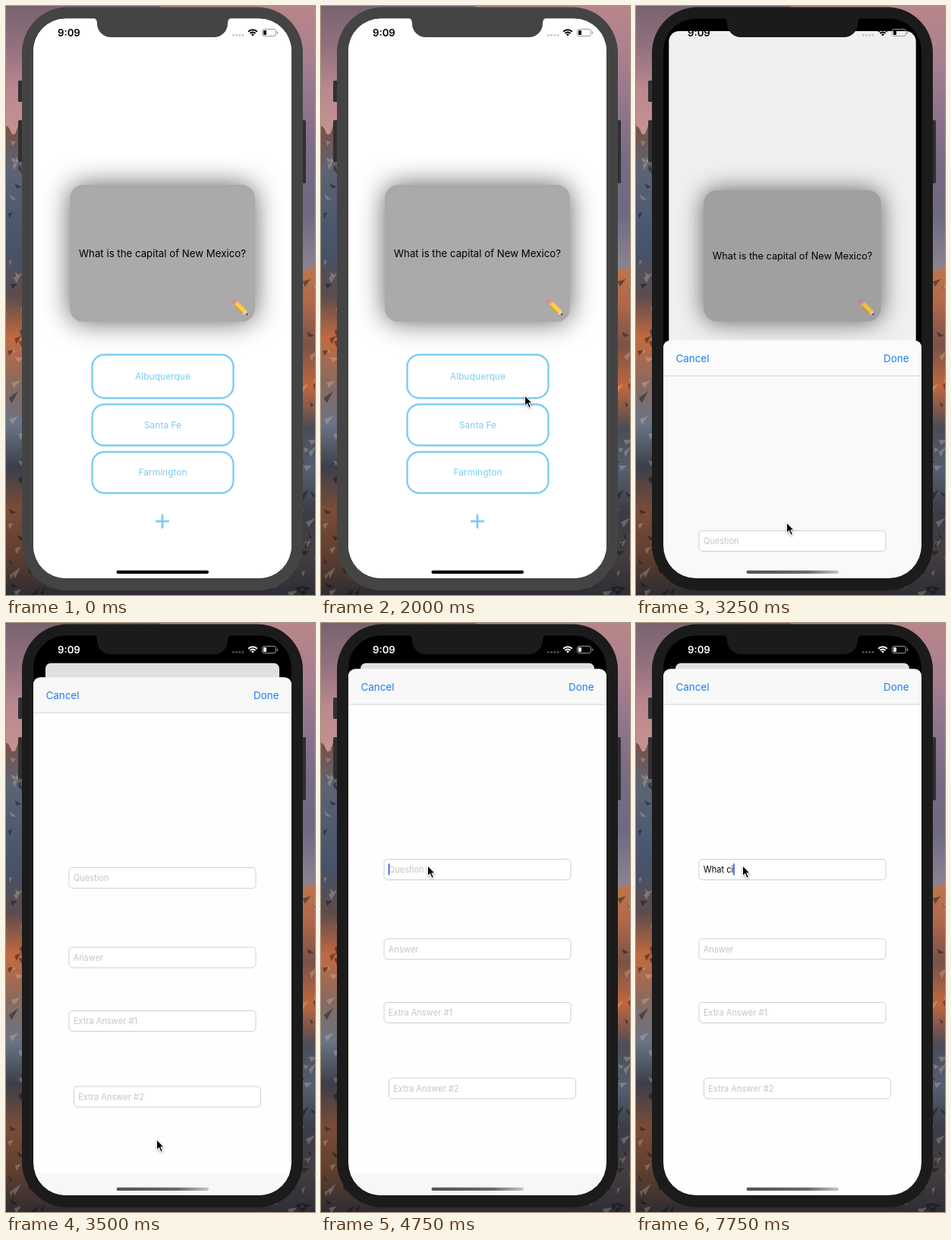
These frames come from a looping animation (407 by 774 pixels, 8000 ms). An HTML page with a canvas:

```html
<!DOCTYPE html>
<html lang="en">
<head>
<meta charset="utf-8">
<title>Flashcards</title>
<style>
html, body { margin: 0; width: 100%; height: 100%; overflow: hidden; background: #333; }
canvas { display: block; width: 407px; height: 774px; }
</style>
</head>
<body>
<canvas id="stage" width="407" height="774"></canvas>
<script>
const W = 407, H = 774, LOOP = 8000, STEP = 250;
const stage = document.getElementById('stage');
const BLUE = '#7dcdf3', LINK = '#1f7bf6';
let ctx = stage.getContext('2d');

function box(x, y, w, h, r, fill, stroke, line = 1) {
  ctx.beginPath();
  ctx.roundRect(x, y, w, h, r);
  if (fill) { ctx.fillStyle = fill; ctx.fill(); }
  if (stroke) { ctx.strokeStyle = stroke; ctx.lineWidth = line; ctx.stroke(); }
}

function triangle(x0, y0, x1, y1, x2, y2, fill) {
  ctx.beginPath();
  ctx.moveTo(x0, y0);
  ctx.lineTo(x1, y1);
  ctx.lineTo(x2, y2);
  ctx.closePath();
  ctx.fillStyle = fill;
  ctx.fill();
}

function text(str, x, y, size, color, align = 'left', weight = 400) {
  ctx.font = `${weight} ${size}px Inter, Roboto, sans-serif`;
  ctx.textAlign = align;
  ctx.fillStyle = color;
  ctx.fillText(str, x, y);
}

// Evenly spaced colours along a line
function blend(x0, y0, x1, y1, colors) {
  const g = ctx.createLinearGradient(x0, y0, x1, y1);
  colors.forEach((c, i) => g.addColorStop(i / (colors.length - 1), c));
  return g;
}

function random(seed) {
  return () => (seed = (seed * 16807) % 2147483647) / 2147483647;
}

function mountain(x, w, top, tones, seed) {
  const rnd = random(seed);
  ctx.fillStyle = blend(0, top, 0, H, tones);
  ctx.beginPath();
  ctx.moveTo(x, H);
  for (let dx = 0; dx <= w; dx += 4) ctx.lineTo(x + dx, top + rnd() * 14);
  ctx.lineTo(x + w, H);
  ctx.fill();
  for (let y = top + 16; y < H; y += 2) {
    const px = x + rnd() * w, len = 4 + rnd() * 9, lean = (rnd() - 0.5) * 18;
    triangle(px, y, px + len, y + lean, px + len * 0.3, y + 7,
      rnd() < 0.6 ? 'rgba(8,12,20,.42)' : 'rgba(255,228,210,.24)');
  }
}

function paintWallpaper() {
  ctx.fillStyle = blend(0, 0, 0, 165, ['#79636f', '#93717f', '#bb888f', '#c4928f']);
  ctx.fillRect(0, 0, W / 2, H);
  ctx.fillStyle = blend(0, 0, 0, 340, ['#b98689', '#a98090', '#8e758c', '#786b84', '#6f6981', '#8a8290']);
  ctx.fillRect(W / 2, 0, W / 2, H);
  mountain(0, W / 2, 157, ['#7a5146', '#5d6373', '#4f5b70', '#465267', '#5d4c4c', '#c46a40',
    '#8a6a5e', '#6a7485', '#3c3f4a', '#7a4c38', '#61402f', '#2e2c31'], 17);
  mountain(W / 2, W / 2 + 4, 336, ['#c0784f', '#b0684a', '#7a5248', '#c0673e', '#4b4c57',
    '#565f70', '#3a3c46', '#453e41', '#2d2e35'], 61);
  ctx.fillStyle = '#2f2d33';
  ctx.fillRect(60, 760, 290, 14);
}

function makeWallpaper() {
  const layer = document.createElement('canvas');
  layer.width = W;
  layer.height = H;
  const main = ctx;
  ctx = layer.getContext('2d');
  paintWallpaper();
  ctx = main;
  return layer;
}

function screenBox(radius, fill) {
  box(36, 16.5, 340, 735.5, radius, fill);
}

function bezel(color) {
  box(16, 98, 6, 28, 1.5, '#303033');
  box(16, 150, 6, 55, 1.5, '#303033');
  box(390, 150, 5, 83, 1.5, '#303033');
  box(21, 1.5, 370, 766.5, 60, color);
}

function notch(color) {
  ctx.fillStyle = color;
  ctx.beginPath();
  ctx.moveTo(112, 15);
  ctx.arcTo(120, 15, 120, 30, 7);
  ctx.arcTo(120, 41, 140, 41, 18);
  ctx.arcTo(292, 41, 292, 22, 18);
  ctx.arcTo(292, 15, 300, 15, 7);
  ctx.lineTo(300, 15);
  ctx.fill();
}

function statusBar(ink, faint) {
  text('9:09', 68, 39.6, 13.2, ink, 'left', 600);
  for (let i = 0; i < 4; i++) box(298 + i * 4.2, 37, 2.8, 2.8, 1.4, faint);
  ctx.strokeStyle = ink;
  for (const [r, line] of [[8.2, 2], [5, 2], [1.4, 2.8]]) {
    ctx.lineWidth = line;
    ctx.beginPath();
    ctx.arc(325, 39.5, r, -Math.PI * 0.75, -Math.PI * 0.25);
    ctx.stroke();
  }
  box(337.5, 30.5, 18, 9, 2.5, null, '#999');
  box(339, 32, 4, 6, 1, ink);
  box(357, 33.5, 1.3, 3.2, 0.6, '#999');
}

function pencil() {
  ctx.save();
  ctx.translate(299, 387);
  ctx.rotate(Math.PI / 4);
  box(-1, -4, 6, 8, 2, '#d98a92');
  box(3.5, -4, 3, 8, 0, '#b9b2ac');
  box(6, -4, 15, 8, 0, blend(0, -4, 0, 4, ['#f3b92e', '#ffd95c', '#d8921f']));
  triangle(21, -4, 27.5, 0, 21, 4, '#eed0a2');
  triangle(24.8, -1.7, 27.5, 0, 24.8, 1.7, '#3a3330');
  ctx.restore();
}

// Card screen, shrunk about its centre and dimmed while a sheet covers it
function cardScreen(scale, dim, radius) {
  ctx.save();
  ctx.translate(206, 384 + (1 - scale) * 18);
  ctx.scale(scale, scale);
  ctx.translate(-206, -384);
  screenBox(radius, '#fff');
  ctx.clip();

  ctx.shadowColor = 'rgba(0,0,0,.62)';
  ctx.shadowBlur = 35 * scale;
  box(84, 235, 244, 180, 18, '#aaa');
  ctx.shadowColor = 'transparent';
  text('What is the capital of New Mexico?', 206, 330, 13.25, '#000', 'center');
  pencil();

  for (const [label, y, h] of [['Albuquerque', 458.2, 57], ['Santa Fe', 523.5, 54], ['Farmington', 586, 54]]) {
    box(113.5, y, 186, h, 16, null, BLUE, 2.4);
    text(label, 206.5, y + h / 2 + 4.4, 12, BLUE, 'center');
  }
  box(197, 675.8, 18, 2.8, 0, BLUE);
  box(204.6, 668, 2.8, 18.5, 0, BLUE);

  screenBox(radius, `rgba(0,0,0,${dim})`);
  ctx.restore();
}

function field(hint, x, y, value, caret) {
  box(x, y, 246, 27, 4.5, '#fff', '#cfcfd1');
  text(value || hint, x + 5.7, y + 17.6, 11.1, value ? '#000' : '#c6c6c9');
  if (caret) box(x + 5.6 + ctx.measureText(value).width, y + 5.5, 1.8, 15.5, 0.8, '#3f65e8');
}

function sheet(top, typed, caret, rising) {
  box(36, top, 340, H, 9, rising ? '#f9f9f9' : '#fefefe');
  box(36, top, 340, 46, [9, 9, 0, 0], rising ? '#fbfbfb' : '#f8f8f8');
  box(36, top + 46, 340, 1, 0, '#d4d4d6');
  text('Cancel', 52.5, top + 28.3, 13.4, LINK);
  text('Done', 359.5, top + 28.3, 13.4, LINK, 'right');
  field('Question', 83, top + 250, typed, caret);
  field('Answer', 83, top + 354.5, '');
  field('Extra Answer #1', 83, top + 438, '');
  field('Extra Answer #2', 89.5, top + 537.5, '');
}

function homeBar(covered) {
  const fill = covered ? blend(146, 0, 267, 0, ['#555', '#5c5c5c', '#6c6c6c', '#c8c8c8']) : '#000';
  box(145.5, 741.8, 121.5, 4.2, 2.1, fill);
}

// Pointer stops: time, x, y
const STOPS = [[1000, 123, 366], [2000, 268, 511], [2750, 198, 678], [3750, 198, 678], [4500, 140, 318]];

function pointerAt(t) {
  let [, x, y] = STOPS[0];
  for (let i = 1; i < STOPS.length; i++) {
    const [t0, x0, y0] = STOPS[i - 1], [t1, x1, y1] = STOPS[i];
    if (t <= t0) break;
    const p = Math.min(1, (t - t0) / (t1 - t0)), ease = p * p * (3 - 2 * p);
    x = x0 + (x1 - x0) * ease;
    y = y0 + (y1 - y0) * ease;
  }
  return [x, y];
}

function pointer(x, y) {
  const arrow = new Path2D('M1 2V13.4L3.8 10.7L6.3 16.6L7.8 16L5.3 10.2H9Z');
  ctx.save();
  ctx.translate(x, y);
  ctx.strokeStyle = '#fff';
  ctx.lineWidth = 2;
  ctx.shadowColor = 'rgba(0,0,0,.35)';
  ctx.shadowBlur = 3;
  ctx.shadowOffsetY = 1;
  ctx.stroke(arrow);
  ctx.shadowColor = 'transparent';
  ctx.fillStyle = '#000';
  ctx.fill(arrow);
  ctx.restore();
}

// One letter per step from 6 s, with a one-step pause after the first word
function typedAt(t) {
  const steps = (t - 5750) / STEP - (t >= 7000 ? 1 : 0);
  return 'What ci'.slice(0, Math.max(0, steps));
}

const wallpaper = makeWallpaper();

function render(now) {
  const t = Math.floor((now % LOOP) / STEP) * STEP;
  const covered = t >= 3250, rising = t === 3250, light = covered && !rising;
  const frame = covered ? '#1b1b1b' : '#444';

  ctx.drawImage(wallpaper, 0, 0);
  bezel(frame);
  ctx.save();
  screenBox(43, covered ? '#000' : '#fff');
  ctx.clip();
  if (!covered) cardScreen(1, 0, 0);
  else if (rising) cardScreen(0.957, 0.06, 14);
  else cardScreen(0.906, 0.12, 8);

  statusBar(light ? '#fff' : '#000', light ? '#555' : '#c4c4c4');
  if (covered) {
    const top = rising ? 439.5 : t === 3500 ? 71.5 : 60.5;
    const caret = t >= 4750 && (t < 5500 || t >= 6000);
    sheet(top, typedAt(t), caret, rising);
    if (light && t < 7250) box(36, 723, 340, 30, 0, '#f7f7f7');
  }
  homeBar(covered);
  ctx.restore();
  notch(frame);
  if (t >= STOPS[0][0]) pointer(...pointerAt(t));
}

function tick() {
  render(performance.now());
  requestAnimationFrame(tick);
}
tick();
</script>
</body>
</html>
```
